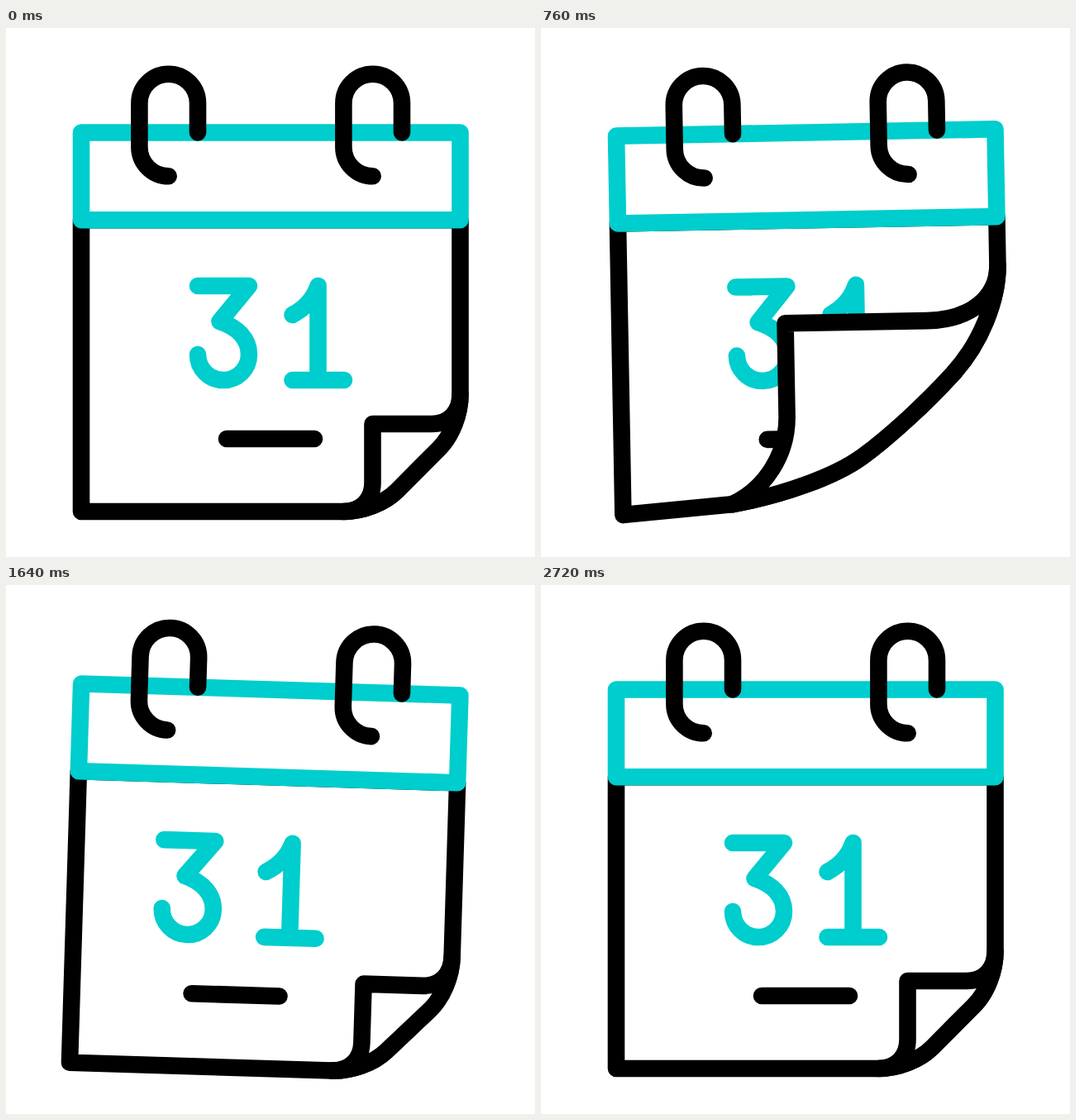
Animation of 640 by 640 pixels, one loop 3.2 s. Source, as an HTML page:

```html
<!DOCTYPE html>
<html>
<head>
<meta charset="utf-8">
<style>
  html, body { margin: 0; height: 100%; overflow: hidden; background: #fff; }
  svg { display: block; width: 100%; height: 100%; }
  path { fill: none; stroke: #000; stroke-width: 20.6; stroke-linecap: round; stroke-linejoin: round; }
  .teal { stroke: #00cdcd; }
  .paper { fill: #fff; }
</style>
</head>
<body>
<svg viewBox="0 0 640 640">
  <defs>
    <path id="ring" d="M232 126.5V91a35.3 35.3 0 0 0-70.6 0V144a35.3 35.3 0 0 0 35.3 35.3"/>
  </defs>
  <g id="calendar">
    <path id="page" class="paper"/>
    <path id="three" class="teal" d="M232 312H294L258.5 355C280 362 294 376 294 395A31 31 0 0 1 232 395"/>
    <path id="one" class="teal" d="M346.5 347C360 340 372 328 377.5 312V426M346.5 426H409"/>
    <path id="dash" d="M267 497H373"/>
    <path id="curl" class="paper"/>
    <path class="teal paper" d="M91 126.5H549.5V232.3H91Z"/>
    <use href="#ring"/>
    <use href="#ring" x="247"/>
  </g>
</svg>
<script>
const LOOP = 3200, STEP = 40, SIDE = 549.5;
const el = id => document.getElementById(id);

// Keys are [time, value] pairs joined by sine easing.
const swing = [[0, 0], [600, -6], [960, 6], [1360, -3], [1760, 3], [2160, -2], [2480, 0]];
const lift = [[0, 0], [570, 1.127], [1200, 0]];
const shake = [0, -36.4, 11.5, -5, 0].map((x, i) => [1360 + 320 * i, x]);
const shaken = ['three', 'dash', 'one'];

function valueAt(keys, t) {
  const i = keys.findIndex(([time]) => t < time);
  if (i === 0) return keys[0][1];
  if (i < 0) return keys[keys.length - 1][1];
  const [t0, a] = keys[i - 1], [t1, b] = keys[i];
  return a + (b - a) * (1 - Math.cos(Math.PI * (t - t0) / (t1 - t0))) / 2;
}

const between = (p, q, f) => p.map((v, i) => v + (q[i] - v) * f);

// Rounds the corner c on the way from a to b.
const bend = (a, c, b) => `C${between(a, c, 0.6)} ${between(b, c, 0.6)} ${b}`;

// Follows a polyline, rounding each inner corner from middle to middle.
function smooth(points) {
  let from = points[0], path = '' + from;
  for (let i = 1; i < points.length - 1; i++) {
    const last = i === points.length - 2;
    const to = last ? points[i + 1] : between(points[i], points[i + 1], 0.5);
    path += bend(from, points[i], to);
    from = to;
  }
  return path;
}

function drawPaper(k) {
  const mix = (flat, lifted) => flat + (lifted - flat) * k;
  const right = [SIDE, mix(443, 272)];
  const bottom = [mix(408, 200.6), mix(585, 573.3)];
  const edge = smooth([
    right,
    [SIDE, mix(483, 347)],
    [mix(498.6, 429), mix(534, 475)],
    [mix(448, 312), mix(585, 555)],
    bottom
  ]);
  const foldX = mix(443.5, 273), foldY = mix(479, 342);
  const left = [foldX, mix(550, 459)], top = [mix(515, 456.6), foldY];
  const fold = bend(bottom, [foldX, mix(585, 540)], left) +
    `L${foldX} ${foldY}L${top}` + bend(top, [SIDE, foldY], right);
  el('page').setAttribute('d', `M${SIDE} 232.3L${edge}L91 585V232.3Z`);
  el('curl').setAttribute('d', `M${edge}${fold}Z`);
}

function draw(t) {
  el('calendar').setAttribute('transform', `rotate(${valueAt(swing, t)} 320 126.5)`);
  shaken.forEach((id, i) =>
    el(id).setAttribute('transform', `translate(${valueAt(shake, t - i * STEP)} 0)`));
  drawPaper(valueAt(lift, t));
}

const start = performance.now();
function tick() {
  const t = (performance.now() - start) % LOOP;
  draw(Math.floor(t / STEP) * STEP);
  requestAnimationFrame(tick);
}
tick();
</script>
</body>
</html>
```
